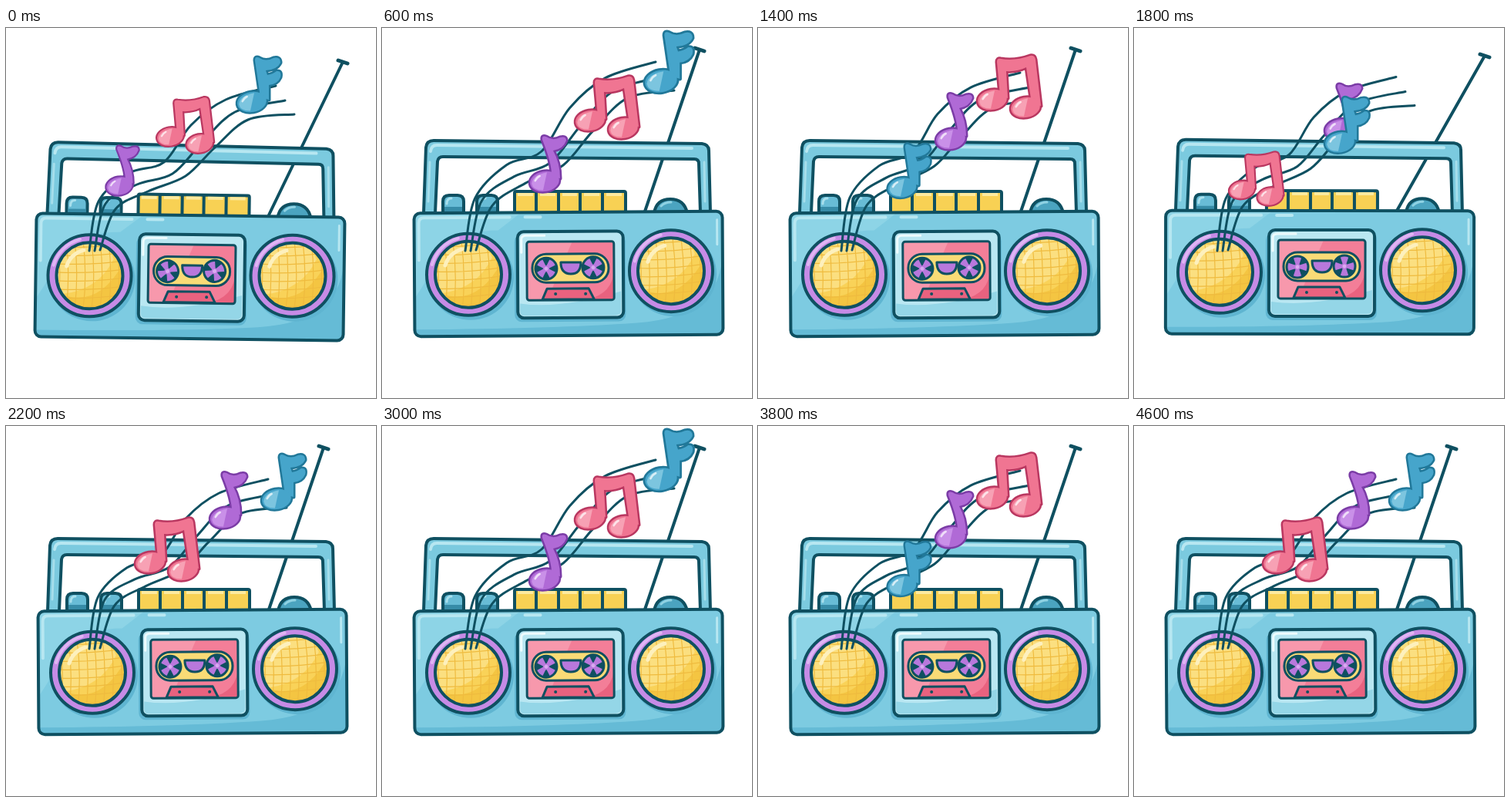
Write an HTML page that moves like this. It is 480 px wide and 480 px high and loops after 4800 ms.

```html
<!DOCTYPE html>
<html lang="en">
<head>
<meta charset="utf-8">
<title>Boombox</title>
<style>
html, body { margin: 0; width: 100%; height: 100%; overflow: hidden; background: #fff }
svg { display: block; width: 100vw; height: 100vh }
.ink { stroke: #0f5061; stroke-width: 4; stroke-linejoin: round; stroke-linecap: round }
.thin { stroke-width: 3 }
.line { fill: none }
</style>
</head>
<body>
<svg viewBox="0 0 480 480">
  <defs>
    <clipPath id="cone"><circle r="43"/></clipPath>
    <clipPath id="box"><rect x="41" y="239" width="400" height="160" rx="8"/></clipPath>
    <clipPath id="window"><rect x="187" y="277" width="113" height="76" rx="3"/></clipPath>
    <g id="speaker">
      <ellipse cx="3" cy="4" rx="56" ry="55" fill="#5fb5d1"/>
      <ellipse class="ink" rx="54" ry="53" fill="#c68be6"/>
      <path d="M-47-13A49 49 0 0 1 -13-47" fill="none" stroke="#dfb5f3" stroke-width="4" stroke-linecap="round"/>
      <circle r="43" fill="#f9d258"/>
      <g clip-path="url(#cone)">
        <path d="M-43 22Q10 46 43-16V43H-43Z" fill="#f4c542"/>
        <path d="M-43-43H22L31-22Q12 18-34 24L-48 10Z" fill="#fbdf80"/>
        <path id="mesh" fill="none" stroke="#efbb3e" stroke-width="1.2"/>
        <path d="M-30-12Q-25-28-8-33" fill="none" stroke="#fdf0bd" stroke-width="5" stroke-linecap="round"/>
      </g>
      <circle class="ink" r="43" fill="none"/>
    </g>
    <g id="reel">
      <circle class="ink thin" r="14" fill="#b878dc"/>
      <path d="M-4-13L0-5L4-13ZM-4 13L0 5L4 13ZM-13-4L-5 0L-13 4ZM13-4L5 0L13 4Z" fill="#0f5061" stroke="#0f5061" stroke-width="2" stroke-linejoin="round"/>
      <circle r="2.5" fill="#d9a9f0"/>
    </g>
    <g id="knob">
      <path class="ink" d="M0 240V225Q0 217 8 217H19Q27 217 27 225V240Z" fill="#68bcd6"/>
      <path d="M2 232H25V240H2Z" fill="#378ca8"/>
      <path d="M5 228Q5 221 11 221" fill="none" stroke="#a9e0ed" stroke-width="3" stroke-linecap="round"/>
    </g>
  </defs>

  <g id="antenna" class="ink line"><path id="rod"/><path id="cap" stroke-width="5"/></g>

  <g id="top">
    <path class="ink" fill="#7bcadf" fill-rule="evenodd" d="M54 240L57 155Q58 146 67 146L415 150Q424 151 424 159L426 240H413L411 176Q411 170 405 170L79 167Q73 167 72 173L69 240Z"/>
    <path d="M63 160Q64 152 71 152L402 156" fill="none" stroke="#b7e7f1" stroke-width="4" stroke-linecap="round"/>
    <path d="M62 174L60 225M418 174L419 225" fill="none" stroke="#a6deeb" stroke-width="3" stroke-linecap="round"/>
    <use href="#knob" x="79"/>
    <use href="#knob" x="123"/>
    <path class="ink" d="M353 240Q356 222 374 222T396 240Z" fill="#4ba4c0"/>
    <path d="M362 231Q367 226 375 226" fill="none" stroke="#8fd2e3" stroke-width="3" stroke-linecap="round"/>
    <rect class="ink" x="172" y="212" width="144" height="28" rx="2" fill="#f8d154"/>
    <path d="M176 216H196M205 216H225M234 216H253M262 216H282M291 216H311" stroke="#fcea9f" stroke-width="4"/>
    <path class="ink" d="M200 213V239M229 213V239M257 213V239M286 213V239"/>
  </g>

  <g id="body">
    <rect x="41" y="239" width="400" height="160" rx="8" fill="#7dcbe1"/>
    <g clip-path="url(#box)">
      <path d="M441 290Q440 376 330 383T41 390V400H442Z" fill="#65bbd6"/>
      <path d="M41 239H180L150 262Q70 262 54 330L41 350Z" fill="#8dd4e6"/>
      <path d="M47 300V252Q47 245 54 245H165M185 245H205" fill="none" stroke="#b7e7f1" stroke-width="4" stroke-linecap="round"/>
      <path d="M434 250V282" fill="none" stroke="#b7e7f1" stroke-width="3" stroke-linecap="round"/>
    </g>
    <rect class="ink" x="41" y="239" width="400" height="160" rx="8" fill="none"/>
    <use href="#speaker" x="111" y="319"/>
    <use href="#speaker" x="374" y="316"/>
    <rect x="171" y="268" width="144" height="113" rx="9" fill="#5fb5d1"/>
    <rect class="ink" x="175" y="264" width="137" height="112" rx="8" fill="#b9e7f2"/>
    <path d="M178 357Q230 365 309 342V366Q309 373 302 373H184Q178 373 178 367Z" fill="#94d6e7"/>
    <path d="M180 291V274Q180 269 186 269H210" fill="none" stroke="#edfbfd" stroke-width="3" stroke-linecap="round"/>
    <g clip-path="url(#window)">
      <rect x="187" y="277" width="113" height="76" fill="#f37e98"/>
      <path d="M187 277H246L213 353H187Z" fill="#f798ac"/>
      <path d="M300 307Q302 345 263 353H300Z" fill="#e9627f"/>
    </g>
    <rect class="ink thin" x="187" y="277" width="113" height="76" rx="3" fill="none"/>
    <rect class="ink thin" x="194" y="293" width="99" height="37" rx="18" fill="#f9db76"/>
    <g id="reelA"><use href="#reel"/></g>
    <g id="reelB"><use href="#reel"/></g>
    <path class="ink thin" d="M231 304H257Q257 319 244 319T231 304Z" fill="#b878dc"/>
    <path class="ink thin" d="M207 352L213 338H267L274 352Z" fill="#e9627f"/>
    <g fill="#0f5061"><circle cx="224" cy="345" r="2"/><circle cx="263" cy="345" r="2"/></g>
  </g>
  <g id="staff" class="ink line thin"><path/><path/><path/></g>
  <g id="notes"></g>
</svg>
<script>
const $ = id => document.getElementById(id);
const mix = (a, b, k) => a.map((v, i) => v + (b[i] - v) * k);

let mesh = '';
for (let p = -40; p <= 40; p += 11) mesh += `M${p - 2}-45Q${p + 4} 0 ${p - 1} 45M-45 ${p + 3}Q0 ${p + 5} 45 ${p - 2}`;
$('mesh').setAttribute('d', mesh);

// Four-step bounce: body x, y, tilt; top x, y, tilt; antenna tip x, y.
const bounce = [
  [-2.5, 4, .75, 0, 4.5, .75, 437, 44],
  [0, -2, .1, 0, -1, .1, 455, 36],
  [0, -3, -.2, 0, -2, -.1, 435, 20],
  [1, 0, -.35, 0, 0, 0, 412, 28]
];

// Staff drift away from its lowest pose: step, end x, end y, middle y.
const drift = [[0, 0, 0, 0], [3, 5, -31, -14], [7, -10, -17, -13], [11, -10, -6, -6], [12, 0, 0, 0]];
const staffs = [
  [108, 289, 120, 225, 160, 188, 205, 174, 240, 126, 285, 93, 350, 75],
  [115, 289, 129, 228, 170, 203, 216, 189, 254, 149, 297, 109, 362, 94],
  [122, 288, 142, 235, 184, 212, 233, 192, 270, 156, 314, 119, 374, 112]
];
const reach = [0, .1, .3, .4, .7, .9, 1];
const lift = [0, .5, .65, 1, .4, .1, 0];

// Each key: step, head x, head y, scale.
const notes = [
  { fill: '#b06ad6', edge: '#7b3ca6', shine: '#c990e8', heads: [[0, 0]],
    stem: 'M9-6Q10-22-3-54Q-4-60 2-58Q10-52 20-57Q28-59 28-53Q24-42 11-40Q20-24 20-4Z',
    keys: [[0, 147, 205, .88], [3, 211, 199, 1], [7, 250, 144, 1], [11, 284, 119, 1]] },
  { fill: '#f07592', edge: '#b93760', shine: '#f7a1b4', heads: [[0, 0], [43, 10]],
    stem: 'M10-5L6-49Q6-54 11-53Q30-50 49-57Q55-58 56-52L63 8L51 5L44-42Q32-36 18-37L20-2Z',
    keys: [[9, 140, 210, .85], [11, 187, 177, 1], [12, 213, 141, .89], [15, 270, 120, 1], [19, 304, 93, 1], [20, 318, 77, 1]] },
  { fill: '#46a5cb', edge: '#217899', shine: '#7cc5df', heads: [[0, 0]],
    stem: 'M11-6L4-54Q4-60 10-57Q18-52 28-57Q37-59 37-51Q33-42 18-41L20-35Q27-36 32-40Q39-41 37-32Q33-23 22-22L22-3Z',
    keys: [[4, 138, 214, .86], [7, 187, 207, .97], [8, 225, 175, 1], [11, 351, 95, 1], [12, 319, 96, 1], [13, 335, 80, 1], [14, 348, 77, 1], [15, 362, 69, 1.1]] }
];

for (const n of notes) {
  const spot = h => `translate(${h}) rotate(-10)`;
  const shape = `<path d="${n.stem}"/>` + n.heads.map(h => `<ellipse rx="19" ry="13" transform="${spot(h)}"/>`).join('');
  const shines = n.heads.map(h => `<g transform="${spot(h)}"><path d="M-17 0Q-14-11 5-11L-4 11Q-17 9-17 0Z" fill="${n.shine}"/><path d="M-12-3Q-9-7-5-8" fill="none" stroke="#fff" stroke-opacity=".7" stroke-width="2.5" stroke-linecap="round"/></g>`).join('');
  n.el = document.createElementNS('http://www.w3.org/2000/svg', 'g');
  n.el.innerHTML = `<g fill="${n.edge}" stroke="${n.edge}" stroke-width="5" stroke-linejoin="round">${shape}</g><g fill="${n.fill}">${shape}</g>${shines}`;
  $('notes').append(n.el);
}

function sample(keys, t) {
  const i = keys.findIndex(k => k[0] >= t);
  if (i < 1) return keys[Math.max(i, 0)];
  const a = keys[i - 1], b = keys[i];
  return mix(a, b, (t - a[0]) / (b[0] - a[0]));
}

// Smooth curve through a flat list of points.
function curve(p) {
  const at = i => { i = Math.max(0, Math.min(p.length / 2 - 1, i)); return [p[2 * i], p[2 * i + 1]]; };
  let d = 'M' + at(0);
  for (let i = 0; i < p.length / 2 - 1; i++) {
    const [a, b, c, e] = [at(i - 1), at(i), at(i + 1), at(i + 2)];
    d += `C${b.map((v, j) => v + (c[j] - a[j]) / 6)} ${c.map((v, j) => v - (e[j] - b[j]) / 6)} ${c}`;
  }
  return d;
}

function draw(step) {
  const [bx, by, br, tx, ty, tr, ax, ay] = bounce[step % 4];
  $('body').setAttribute('transform', `translate(${bx} ${by}) rotate(${br} 241 318)`);
  $('top').setAttribute('transform', `translate(${tx} ${ty}) rotate(${tr} 241 195)`);
  $('rod').setAttribute('d', `M341 ${238 + ty}L${ax} ${ay}`);
  $('cap').setAttribute('d', `M${ax - 6} ${ay - 2}L${ax + 6} ${ay + 2}`);
  const spin = (step + 1) % 4 * 22.5;
  $('reelA').setAttribute('transform', `translate(212 312) rotate(${spin})`);
  $('reelB').setAttribute('transform', `translate(273 311) rotate(${spin})`);

  const [, ex, ey, my] = sample(drift, step);
  staffs.forEach((s, i) => {
    const points = s.map((v, j) => {
      const k = j >> 1;
      return j % 2 ? v + ey * reach[k] + (my - ey * .4) * lift[k] : v + ex * reach[k];
    });
    $('staff').children[i].setAttribute('d', curve(points));
  });

  for (const n of notes) {
    const t = step < n.keys[0][0] ? step + 12 : step;
    const [, x, y, s] = sample(n.keys, t);
    n.el.setAttribute('transform', `translate(${x} ${y}) scale(${s})`);
  }
}

function tick() {
  draw(Math.floor(performance.now() / 200) % 12);
  requestAnimationFrame(tick);
}
tick();
</script>
</body>
</html>
```
